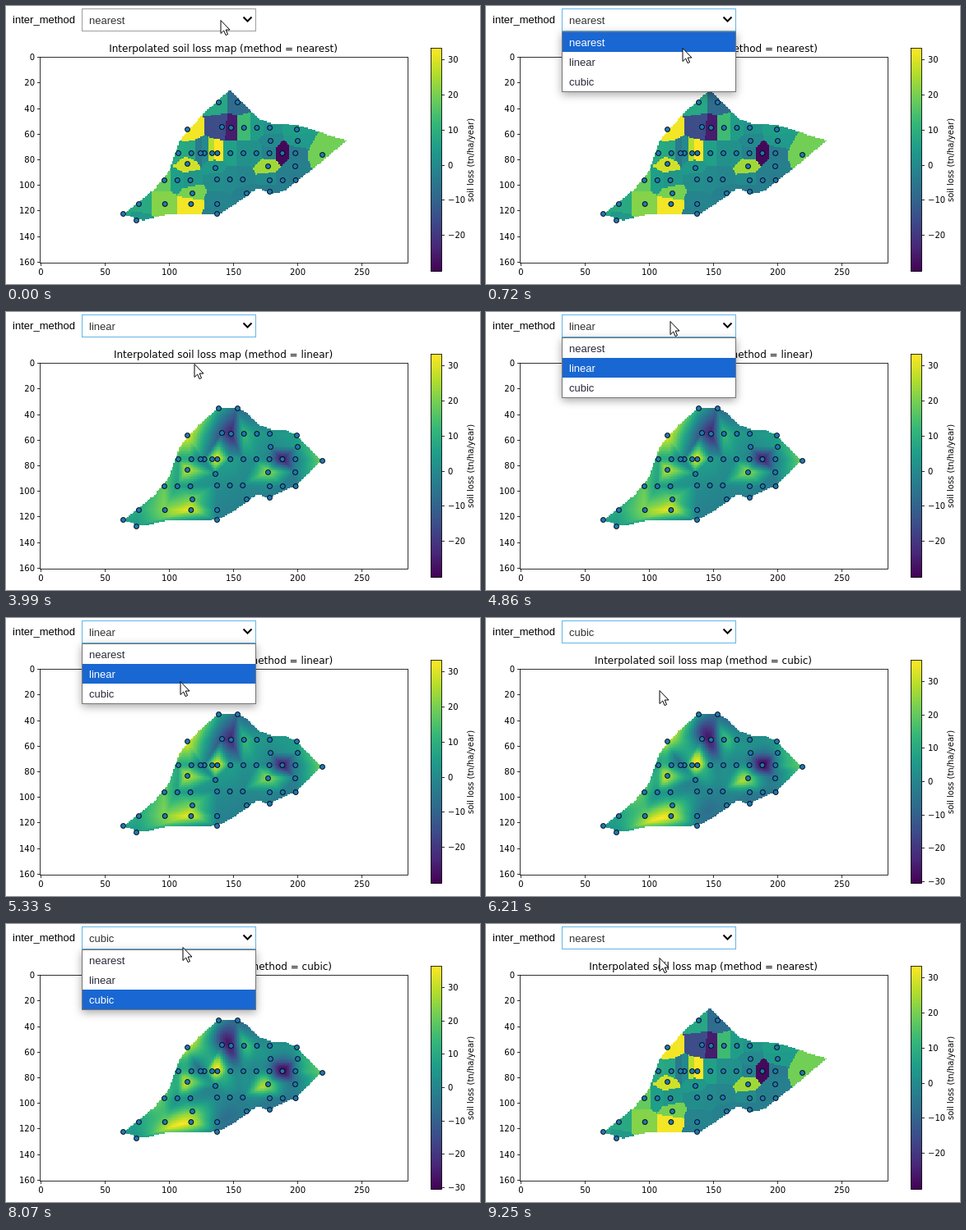
An HTML page with a canvas for the animation above (9.92 s loop, 576 px wide and 339 px high).

```html
<!DOCTYPE html>
<html lang="en">
<head>
<meta charset="utf-8">
<title>Interpolated soil loss map</title>
<style>
html, body { margin: 0; width: 100%; height: 100%; overflow: hidden; background: #fff; }
canvas { display: block; }
</style>
</head>
<body>
<canvas id="stage" width="576" height="339"></canvas>
<script>
const LOOP = 9920;
const METHODS = ['nearest', 'linear', 'cubic'];
const AXES = { x: 41.5, y: 62.5, w: 447, h: 251, cols: 287, rows: 161 };
const BAR = { x: 516.5, y: 51.5, w: 13, h: 272 };
const RANGES = [[-30.1, 33.4], [-30.1, 33.4], [-30.4, 36.5]];
const VIRIDIS = ['440154', '482878', '3e4989', '31688e', '26828e', '1f9e89', '35b779', '6ece58', 'b5de2b', 'fde725'];

// Sample sites in rows: y, first x, count, spacing
const SITE_ROWS = [
  [117, 258, 2, 23], [147, 262, 1], [148, 273, 4, 15.7], [150, 220, 2, 133], [164, 321, 2, 33],
  [179, 209, 10, 15.8], [179, 236, 2, 14], [181, 384, 1], [192, 220, 1], [197, 254, 1],
  [195, 318, 2, 33], [212, 192, 3, 15.8], [211, 256, 3, 15.6], [212, 320, 3, 15.8],
  [228, 226, 2, 66], [226, 320, 1], [241, 161, 4, 31.7], [253, 142, 2, 114], [261, 158, 1]
];

// Local highs and lows of the soil loss: x, y, percent of the colour range
const HILLS = [
  [281, 117, -23], [220, 150, 40], [270, 148, -54], [288, 148, 18], [354, 157, 10],
  [238, 179, -18], [255, 178, 52], [334, 179, -46], [384, 181, 35], [220, 192, 40],
  [318, 195, 40], [192, 211, 23], [225, 237, 58], [193, 240, 32], [152, 247, 22]
];

const BASIN = new Path2D(`M272 102L308 138 322 143 354 145 394 158 414 164 374 198 337 226 322 229
  306 222 275 244 257 255 196 254 166 262 143 254 181 223 199 200 210 166 238 133Z`);

const stage = document.getElementById('stage');
const screen = stage.getContext('2d');

// Gentle regional slope plus the hills
function soilLoss(x, y) {
  const slope = 50 - 0.07 * (x - 290) - 0.12 * (y - 180);
  const pct = HILLS.reduce((sum, [hx, hy, h]) => sum + h * Math.exp(-((x - hx) ** 2 + (y - hy) ** 2) / 128), slope);
  return -30.1 + 0.635 * pct;
}

const SITES = SITE_ROWS.flatMap(([y, first, count, gap = 0]) => Array.from({ length: count }, (_, i) => {
  const x = first + i * gap;
  return { x, y, v: soilLoss(x, y), gx: 0, gy: 0, near: new Set() };
}));

const rgb = VIRIDIS.map(h => [0, 2, 4].map(i => parseInt(h.slice(i, i + 2), 16)));
function viridis(t) {
  const p = Math.min(Math.max(t, 0), 1) * (rgb.length - 1);
  const i = Math.min(Math.floor(p), rgb.length - 2);
  return rgb[i].map((c, k) => c + (rgb[i + 1][k] - c) * (p - i));
}

// Delaunay: keep every triangle whose circumcircle is empty
function triangulate(sites) {
  const found = [];
  sites.forEach((a, i) => {
    for (let j = i + 1; j < sites.length; j++) {
      for (let k = j + 1; k < sites.length; k++) {
        const b = sites[j], c = sites[k];
        const bx = b.x - a.x, by = b.y - a.y, cx = c.x - a.x, cy = c.y - a.y;
        const area = bx * cy - by * cx;
        if (!area) continue;
        const bb = bx * bx + by * by, cc = cx * cx + cy * cy;
        const ux = (cy * bb - by * cc) / area / 2, uy = (bx * cc - cx * bb) / area / 2;
        const r = Math.hypot(ux, uy) - 1e-6;
        if (sites.some(p => p !== a && p !== b && p !== c && Math.hypot(p.x - a.x - ux, p.y - a.y - uy) < r)) continue;
        found.push({ pts: [a, b, c], area });
        a.near.add(b).add(c); b.near.add(a).add(c); c.near.add(a).add(b);
      }
    }
  });
  return found;
}

// Gradients that minimise curvature along all edges
function estimateGradients(sites) {
  for (let pass = 0; pass < 40; pass++) {
    for (const p of sites) {
      let xx = 0, xy = 0, yy = 0, sx = 0, sy = 0;
      for (const q of p.near) {
        const ex = q.x - p.x, ey = q.y - p.y, w = Math.hypot(ex, ey) ** -3;
        const s = (6 * (q.v - p.v) - 2 * (q.gx * ex + q.gy * ey)) * w;
        xx += 4 * ex * ex * w; xy += 4 * ex * ey * w; yy += 4 * ey * ey * w;
        sx += s * ex; sy += s * ey;
      }
      const det = xx * yy - xy * xy;
      p.gx = (yy * sx - xy * sy) / det;
      p.gy = (xx * sy - xy * sx) / det;
    }
  }
}

const triangles = triangulate(SITES);
estimateGradients(SITES);

function locate(x, y) {
  for (const { pts: [a, b, c], area } of triangles) {
    const v = ((x - a.x) * (c.y - a.y) - (y - a.y) * (c.x - a.x)) / area;
    const w = ((b.x - a.x) * (y - a.y) - (b.y - a.y) * (x - a.x)) / area;
    if (v >= -1e-9 && w >= -1e-9 && v + w <= 1 + 1e-9) return { pts: [a, b, c], bary: [1 - v - w, v, w] };
  }
}

function nearest(x, y) {
  const dist = p => (p.x - x) ** 2 + (p.y - y) ** 2;
  return SITES.reduce((best, p) => dist(p) < dist(best) ? p : best).v;
}

function linear(x, y) {
  const hit = locate(x, y);
  return hit && hit.pts.reduce((sum, p, i) => sum + p.v * hit.bary[i], 0);
}

// Bezier triangle built from the site gradients
function cubic(x, y) {
  const hit = locate(x, y);
  if (!hit) return;
  const { pts, bary } = hit;
  let sum = 0, middle = 0;
  pts.forEach((p, i) => {
    sum += p.v * bary[i] ** 3;
    middle -= p.v / 6;
    pts.forEach((q, j) => {
      if (i === j) return;
      const ctrl = p.v + (p.gx * (q.x - p.x) + p.gy * (q.y - p.y)) / 3;
      sum += 3 * ctrl * bary[i] ** 2 * bary[j];
      middle += ctrl / 4;
    });
  });
  return sum + 6 * middle * bary[0] * bary[1] * bary[2];
}

function makeCanvas(w, h) {
  return Object.assign(document.createElement('canvas'), { width: w, height: h });
}

function text(g, str, x, y, font, color = '#000', align = 'left') {
  g.font = font;
  g.fillStyle = color;
  g.textAlign = align;
  g.fillText(str, x, y);
}

function line(g, ...xy) {
  g.beginPath();
  for (let i = 0; i < xy.length; i += 2) g.lineTo(xy[i], xy[i + 1]);
  g.stroke();
}

function renderField(sample, [lo, hi]) {
  const { cols, rows } = AXES;
  const field = makeCanvas(cols, rows), g = field.getContext('2d');
  const img = g.createImageData(cols, rows);
  for (let r = 0; r < rows; r++) {
    for (let c = 0; c < cols; c++) {
      const x = AXES.x + (c + 0.5) * AXES.w / cols, y = AXES.y + (r + 0.5) * AXES.h / rows;
      if (!screen.isPointInPath(BASIN, x, y)) continue;
      const v = sample(x, y);
      if (v !== undefined) img.data.set([...viridis((v - lo) / (hi - lo)), 255], 4 * (r * cols + c));
    }
  }
  g.putImageData(img, 0, 0);
  return field;
}

function renderChart(sample, index) {
  const chart = makeCanvas(576, 339), g = chart.getContext('2d');
  const small = '10px "DejaVu Sans", sans-serif';
  const [lo, hi] = RANGES[index];
  const { x, y, w, h, cols, rows } = AXES;
  g.imageSmoothingEnabled = false;
  g.drawImage(renderField(sample, RANGES[index]), x, y, w, h);

  g.lineWidth = 1;
  for (const p of SITES) {
    g.beginPath();
    g.arc(p.x + 0.5, p.y + 0.5, 3, 0, 7);
    g.fillStyle = '#1f77b4';
    g.fill();
    g.stroke();
  }

  g.lineWidth = 0.8;
  g.strokeRect(x, y, w, h);
  for (let v = 0; v <= 250; v += 50) {
    const tx = Math.round(x + (v + 0.5) * w / cols) + 0.5;
    line(g, tx, y + h, tx, y + h + 3.5);
    text(g, v, tx, 328, small, '#000', 'center');
  }
  for (let v = 0; v <= 160; v += 20) {
    const ty = Math.round(y + (v + 0.5) * h / rows) - 0.5;
    line(g, x - 3.5, ty, x, ty);
    text(g, v, 35, ty + 3.5, small, '#000', 'right');
  }
  text(g, `Interpolated soil loss map (method = ${METHODS[index]})`, 264, 56, '12px "DejaVu Sans", sans-serif', '#000', 'center');

  for (let i = 0; i < BAR.h; i++) {
    g.fillStyle = `rgb(${viridis(1 - i / BAR.h).map(Math.round)})`;
    g.fillRect(BAR.x, BAR.y + i, BAR.w, 1.5);
  }
  g.strokeRect(BAR.x, BAR.y, BAR.w, BAR.h);
  for (let v = -30; v <= 30; v += 10) {
    if (v < lo + 0.2) continue;
    const ty = Math.round(BAR.y + BAR.h * (hi - v) / (hi - lo)) - 0.5;
    line(g, BAR.x + BAR.w, ty, BAR.x + BAR.w + 3.5, ty);
    text(g, String(v).replace('-', '\u2212'), 537, ty + 3.5, small);
  }
  g.translate(568, 188);
  g.rotate(-Math.PI / 2);
  text(g, 'soil loss (tn/ha/year)', 0, 0, small, '#000', 'center');
  return chart;
}

const charts = [nearest, linear, cubic].map(renderChart);

const UI_FONT = '13px "Liberation Sans", Arial, sans-serif';
// One entry per new choice: list pressed, item pressed, list closed, chart redrawn
const PICKS = [
  { press: 200, pick: 2120, close: 2250, redraw: 2380 },
  { press: 4800, pick: 5950, close: 6080, redraw: 6210 },
  { press: 7600, pick: 8990, close: 9060, redraw: 9250 }
];
// Pointer moves: start time, number of steps, end x, end y
const MOVES = [
  [520, 7, 229, 67], [3990, 4, 225, 3], [4460, 2, 224, 11],
  [5060, 5, 212, 77], [5400, 3, 211, 88], [7000, 8, 218, 14], [7940, 6, 211, 41]
];
const STEP = 65;

const within = (t, from, to) => t >= from && t < to;
const methodAfter = (stepName, t) => PICKS.filter(p => t >= p[stepName]).length % 3;

function pointerAt(t) {
  let x = 261, y = 17;
  for (const [start, steps, toX, toY] of MOVES) {
    if (t < start) break;
    const k = Math.min(steps, Math.floor((t - start) / STEP) + 1) / steps;
    const ease = k ** 2.5 / (k ** 2.5 + (1 - k) ** 2.5);
    x += (toX - x) * ease;
    y += (toY - y) * ease;
  }
  return [Math.round(x), Math.round(y)];
}

function drawSelect(g, selected, focused) {
  text(g, 'inter_method', 84, 21, UI_FONT, '#000', 'right');
  g.lineWidth = 1;
  g.strokeStyle = focused ? '#64b5e8' : '#9e9e9e';
  g.strokeRect(92.5, 3.5, 211, 27);
  text(g, METHODS[selected], 101, 22, UI_FONT, '#333');
  g.strokeStyle = '#000';
  g.lineWidth = 2;
  line(g, 288.5, 13.5, 293.5, 18.5, 298.5, 13.5);
}

function drawMenu(g, active) {
  g.save();
  g.shadowColor = 'rgba(0,0,0,.35)';
  g.shadowBlur = 10;
  g.shadowOffsetY = 3;
  g.fillStyle = '#767676';
  g.fillRect(92, 31, 212, 74);
  g.restore();
  g.fillStyle = '#fff';
  g.fillRect(93, 32, 210, 72);
  METHODS.forEach((name, i) => {
    const top = 32 + 24 * i;
    if (i === active) {
      g.fillStyle = '#1967d2';
      g.fillRect(93, top, 210, 24);
    }
    text(g, name, 101, top + 17, UI_FONT, i === active ? '#fff' : '#2a2a3c');
  });
}

const ARROW = new Path2D('M.5 .5V16.5L4.2 13 6.6 18.6 9 17.5 6.7 12H11.5Z');
function drawPointer(g, x, y, pressed) {
  g.save();
  g.translate(x - 0.5, y);
  g.lineWidth = 1;
  g.strokeStyle = '#000';
  g.fillStyle = '#fff';
  g.fill(ARROW);
  g.stroke(ARROW);
  g.restore();
  if (!pressed) return;
  g.beginPath();
  g.arc(x - 1, y - 0.5, 12, 0, 7);
  g.fillStyle = 'rgba(255,225,20,.5)';
  g.fill();
}

function draw(now) {
  const t = now % LOOP;
  const [x, y] = pointerAt(t);
  const selected = methodAfter('close', t);
  const open = PICKS.some(p => within(t, p.press + 60, p.close));
  const pressed = PICKS.some(p => within(t, p.press, p.press + 60) || within(t, p.pick, p.close));
  screen.fillStyle = '#fff';
  screen.fillRect(0, 0, 576, 339);
  screen.drawImage(charts[methodAfter('redraw', t)], 0, 0);
  drawSelect(screen, selected, t >= PICKS[0].press);
  if (open) drawMenu(screen, y < 32 ? selected : Math.min(2, Math.floor((y - 32) / 24)));
  drawPointer(screen, x, y, pressed);
}

const began = performance.now();
function frame() {
  draw(performance.now() - began);
  requestAnimationFrame(frame);
}
frame();
</script>
</body>
</html>
```
